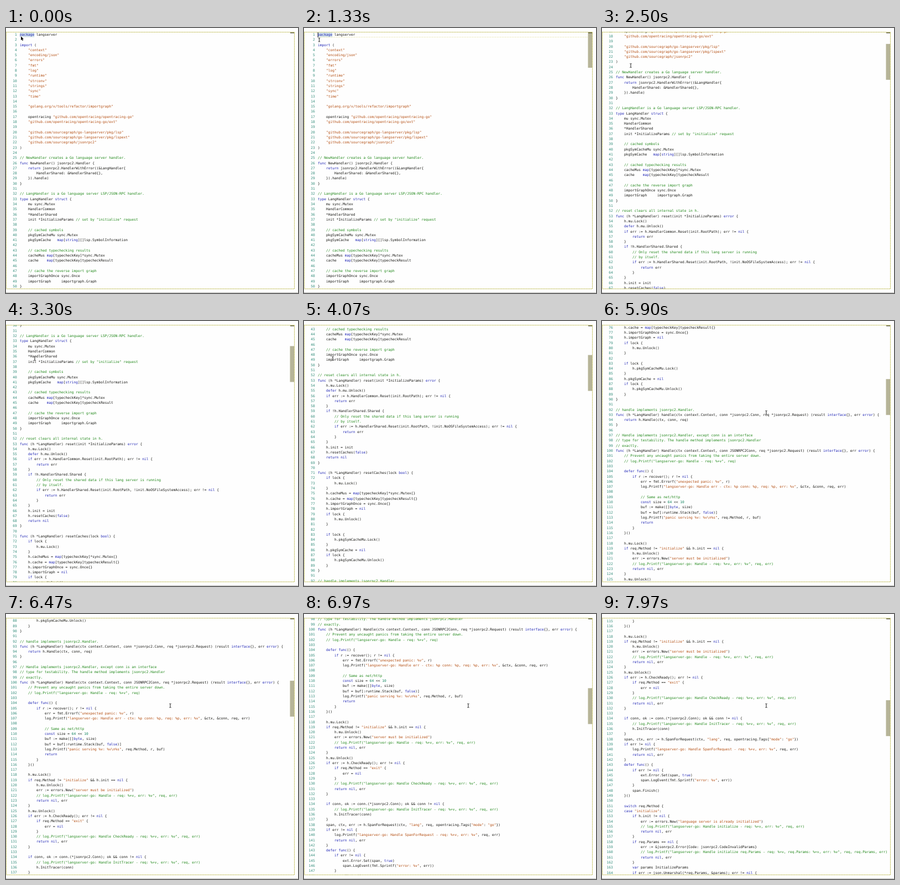
An HTML page with a canvas for the animation above (8000 ms loop, 528 by 480 pixels).

```html
<!DOCTYPE html>
<html lang="en">
<head>
<meta charset="utf-8">
<title>Scrolling through Go code</title>
<style>
html, body { margin: 0; width: 100%; height: 100%; overflow: hidden; background: #fefefe; }
canvas { display: block; }
</style>
</head>
<body>
<canvas id="stage" width="528" height="480"></canvas>
<script>
const code = String.raw`package langserver

import (
	"context"
	"encoding/json"
	"errors"
	"fmt"
	"log"
	"runtime"
	"strconv"
	"strings"
	"sync"
	"time"

	"golang.org/x/tools/refactor/importgraph"

	opentracing "github.com/opentracing/opentracing-go"
	"github.com/opentracing/opentracing-go/ext"

	"github.com/sourcegraph/go-langserver/pkg/lsp"
	"github.com/sourcegraph/go-langserver/pkg/lspext"
	"github.com/sourcegraph/jsonrpc2"
)

// NewHandler creates a Go language server handler.
func NewHandler() jsonrpc2.Handler {
	return jsonrpc2.HandlerWithError((&LangHandler{
		HandlerShared: &HandlerShared{},
	}).handle)
}

// LangHandler is a Go language server LSP/JSON-RPC handler.
type LangHandler struct {
	mu sync.Mutex
	HandlerCommon
	*HandlerShared
	init *InitializeParams // set by "initialize" request

	// cached symbols
	pkgSymCacheMu sync.Mutex
	pkgSymCache   map[string][]lsp.SymbolInformation

	// cached typechecking results
	cacheMus map[typecheckKey]*sync.Mutex
	cache    map[typecheckKey]typecheckResult

	// cache the reverse import graph
	importGraphOnce sync.Once
	importGraph     importgraph.Graph
}

// reset clears all internal state in h.
func (h *LangHandler) reset(init *InitializeParams) error {
	h.mu.Lock()
	defer h.mu.Unlock()
	if err := h.HandlerCommon.Reset(init.RootPath); err != nil {
		return err
	}
	if !h.HandlerShared.Shared {
		// Only reset the shared data if this lang server is running
		// by itself.
		if err := h.HandlerShared.Reset(init.RootPath, !init.NoOSFileSystemAccess); err != nil {
			return err
		}
	}
	h.init = init
	h.resetCaches(false)
	return nil
}

func (h *LangHandler) resetCaches(lock bool) {
	if lock {
		h.mu.Lock()
	}
	h.cacheMus = map[typecheckKey]*sync.Mutex{}
	h.cache = map[typecheckKey]typecheckResult{}
	h.importGraphOnce = sync.Once{}
	h.importGraph = nil
	if lock {
		h.mu.Unlock()
	}

	if lock {
		h.pkgSymCacheMu.Lock()
	}
	h.pkgSymCache = nil
	if lock {
		h.pkgSymCacheMu.Unlock()
	}
}

// handle implements jsonrpc2.Handler.
func (h *LangHandler) handle(ctx context.Context, conn *jsonrpc2.Conn, req *jsonrpc2.Request) (result interface{}, err error) {
	return h.Handle(ctx, conn, req)
}

// Handle implements jsonrpc2.Handler, except conn is an interface
// type for testability. The handle method implements jsonrpc2.Handler
// exactly.
func (h *LangHandler) Handle(ctx context.Context, conn JSONRPC2Conn, req *jsonrpc2.Request) (result interface{}, err error) {
	// Prevent any uncaught panics from taking the entire server down.
	// log.Printf("langserver-go: Handle - req: %+v", req)

	defer func() {
		if r := recover(); r != nil {
			err = fmt.Errorf("unexpected panic: %v", r)
			log.Printf("langserver-go: Handle err - ctx: %p conn: %p, req: %p, err: %v", &ctx, &conn, req, err)

			// Same as net/http
			const size = 64 << 10
			buf := make([]byte, size)
			buf = buf[:runtime.Stack(buf, false)]
			log.Printf("panic serving %v: %v\n%s", req.Method, r, buf)
			return
		}
	}()

	h.mu.Lock()
	if req.Method != "initialize" && h.init == nil {
		h.mu.Unlock()
		err := errors.New("server must be initialized")
		// log.Printf("langserver-go: Handle - req: %+v, err: %v", req, err)
		return nil, err
	}
	h.mu.Unlock()
	if err := h.CheckReady(); err != nil {
		if req.Method == "exit" {
			err = nil
		}
		// log.Printf("langserver-go: Handle CheckReady - req: %+v, err: %v", req, err)
		return nil, err
	}

	if conn, ok := conn.(*jsonrpc2.Conn); ok && conn != nil {
		// log.Printf("langserver-go: Handle InitTracer - req: %+v, err: %v", req, err)
		h.InitTracer(conn)
	}
	span, ctx, err := h.SpanForRequest(ctx, "lang", req, opentracing.Tags{"mode": "go"})
	if err != nil {
		log.Printf("langserver-go: Handle SpanForRequest - req: %+v, err: %v", req, err)
		return nil, err
	}
	defer func() {
		if err != nil {
			ext.Error.Set(span, true)
			span.LogEvent(fmt.Sprintf("error: %v", err))
		}
		span.Finish()
	}()

	switch req.Method {
	case "initialize":
		if h.init != nil {
			err := errors.New("language server is already initialized")
			// log.Printf("langserver-go: Handle initialize - req: %+v, err: %v", req, err)
			return nil, err
		}
		if req.Params == nil {
			err := &jsonrpc2.Error{Code: jsonrpc2.CodeInvalidParams}
			// log.Printf("langserver-go: Handle initialize req.Params - req: %+v, req.Params: %+v, err: %v", req, req.Params, err)
			return nil, err
		}
		var params InitializeParams
		if err := json.Unmarshal(*req.Params, &params); err != nil {
			return nil, err`;

const LOOP = 8000;
const TOP = 7, BOTTOM = 473, RIGHT = 521.5;
const PITCH = 9.306, CHAR = 3.75, TEXT_X = 25, NUM_X = 19.7, BASE = 13.9;
const HOVER = 600, FOCUS = 1000;
const BORDER = '#b9b440';
const INK = ['#1d8616', '#b24a0c', '#1c22b4', '#09805a', '#141410'];

const TOKEN = /(\/\/.*)|("[^"]*")|(\b(?:package|import|func|return|type|struct|map|string|interface|bool|byte|error|if|defer|const|nil|true|false|switch|case|var)\b)|(\b\d+\b)|(\w+|[^\w\s"\/]+|\/)/g;

const lines = code.split('\n').map(raw => {
  const line = raw.replace(/\t/g, '    ');
  return [...line.matchAll(TOKEN)].map(m => ({
    text: m[0],
    x: TEXT_X + m.index * CHAR,
    ink: INK[m.slice(1).findIndex(Boolean)]
  }));
});

// [time, scroll offset]
const scrollKeys = [[1600, 0], [2500, 155], [4070, 388], [5900, 698], [6970, 905], [7970, 1060], [8000, 1064]];

const ctx = document.getElementById('stage').getContext('2d');

function slope(i) {
  if (i === 0) return 0;
  const a = scrollKeys[i - 1], b = scrollKeys[Math.min(i + 1, scrollKeys.length - 1)];
  return (b[1] - a[1]) / (b[0] - a[0]);
}

// Cubic Hermite curve through the scroll keys
function scrollAt(t) {
  if (t <= scrollKeys[0][0]) return 0;
  const i = scrollKeys.findIndex(k => k[0] >= t) - 1;
  const [t0, y0] = scrollKeys[i], [t1, y1] = scrollKeys[i + 1];
  const d = t1 - t0, u = (t - t0) / d, u2 = u * u, u3 = u2 * u;
  return y0 * (2 * u3 - 3 * u2 + 1) + slope(i) * d * (u3 - 2 * u2 + u)
       + y1 * (3 * u2 - 2 * u3) + slope(i + 1) * d * (u3 - u2);
}

function ease(t, from, to) {
  const u = Math.min(1, Math.max(0, (t - from) / (to - from)));
  return u * u * (3 - 2 * u);
}

function pointerAt(t) {
  const a = ease(t, 1400, 1750), b = ease(t, 4500, 5100);
  return [27.5 + 24.5 * a + 245 * b, 21.5 + 46.5 * a + 98 * b];
}

function rect(color, x, y, w, h) {
  ctx.fillStyle = color;
  ctx.fillRect(x, y, w, h);
}

function dashed(color, dash, ...points) {
  ctx.strokeStyle = color;
  ctx.lineWidth = 1;
  ctx.setLineDash(dash);
  ctx.beginPath();
  points.forEach(([x, y]) => ctx.lineTo(x, y));
  ctx.stroke();
  ctx.setLineDash([]);
}

// Large type scaled down keeps the character grid exact
function label(text, x, y, ink, align = 'left') {
  ctx.save();
  ctx.translate(x, y);
  ctx.scale(1 / 8, 1 / 8);
  ctx.font = '49.83px "DejaVu Sans Mono", monospace';
  ctx.textAlign = align;
  ctx.fillStyle = ink;
  ctx.fillText(text, 0, 0);
  ctx.restore();
}

function drawCode(t, scroll) {
  ctx.save();
  ctx.beginPath();
  ctx.rect(0, TOP, RIGHT, BOTTOM - TOP);
  ctx.clip();

  rect('#d3e2ea', TEXT_X, TOP + 1 - scroll, 7 * CHAR, 8.5);
  if (t >= FOCUS) {
    dashed('#dcd873', [1, 2], [TEXT_X, 16.5 - scroll], [513, 16.5 - scroll]);
    if ((t - FOCUS) % 1000 < 500) rect('#111', TEXT_X - 0.3, TOP + 1 - scroll, 1, 9);
  }

  const first = Math.max(0, Math.floor(scroll / PITCH) - 1);
  const last = Math.min(lines.length, first + 54);
  for (let i = first; i < last; i++) {
    const y = BASE + i * PITCH - scroll;
    label(i + 1, NUM_X, y, '#2f8a78', 'right');
    for (const { text, x, ink } of lines[i]) label(text, x, y, ink);
  }
  ctx.restore();
}

function drawFrame(t, scroll) {
  if (t >= HOVER) rect('#b6b498', 513.5, TOP + scroll * 0.1407, 7.5, 65);
  rect('#66654c', 514, 8, 7, 1.5);
  dashed(BORDER, [2, 1], [0.5, TOP + 0.5], [RIGHT, TOP + 0.5], [RIGHT, BOTTOM - 0.5], [0.5, BOTTOM - 0.5], [0.5, TOP + 0.5]);
  dashed('#77776f', [1, 1], [0, 479.5], [528, 479.5]);
}

function outline(path, width, ink) {
  ctx.lineWidth = width;
  ctx.strokeStyle = ink;
  ctx.stroke(path);
}

const arrow = new Path2D('M0 0V7.2L1.7 5.7L2.8 8.2L4 7.7L2.9 5.2H5.1Z');
const beam = new Path2D('M-1.6 -3.5Q0 -3.5 0 -2.6Q0 -3.5 1.6 -3.5M0 -2.6V2.6M-1.6 3.5Q0 3.5 0 2.6Q0 3.5 1.6 3.5');

function drawPointer(t) {
  ctx.save();
  if (t < HOVER) {
    ctx.translate(27, 15);
    outline(arrow, 1.2, '#fff');
    ctx.fillStyle = '#111';
    ctx.fill(arrow);
  } else {
    ctx.translate(...pointerAt(t));
    outline(beam, 2, '#fff');
    outline(beam, 1, '#222');
  }
  ctx.restore();
}

function draw(t) {
  const scroll = scrollAt(t);
  ctx.textRendering = 'geometricPrecision';
  rect('#fefefe', 0, 0, 528, 480);
  drawCode(t, scroll);
  drawFrame(t, scroll);
  drawPointer(t);
}

const start = performance.now();
function tick() {
  draw((performance.now() - start) % LOOP);
  requestAnimationFrame(tick);
}
tick();
</script>
</body>
</html>
```
